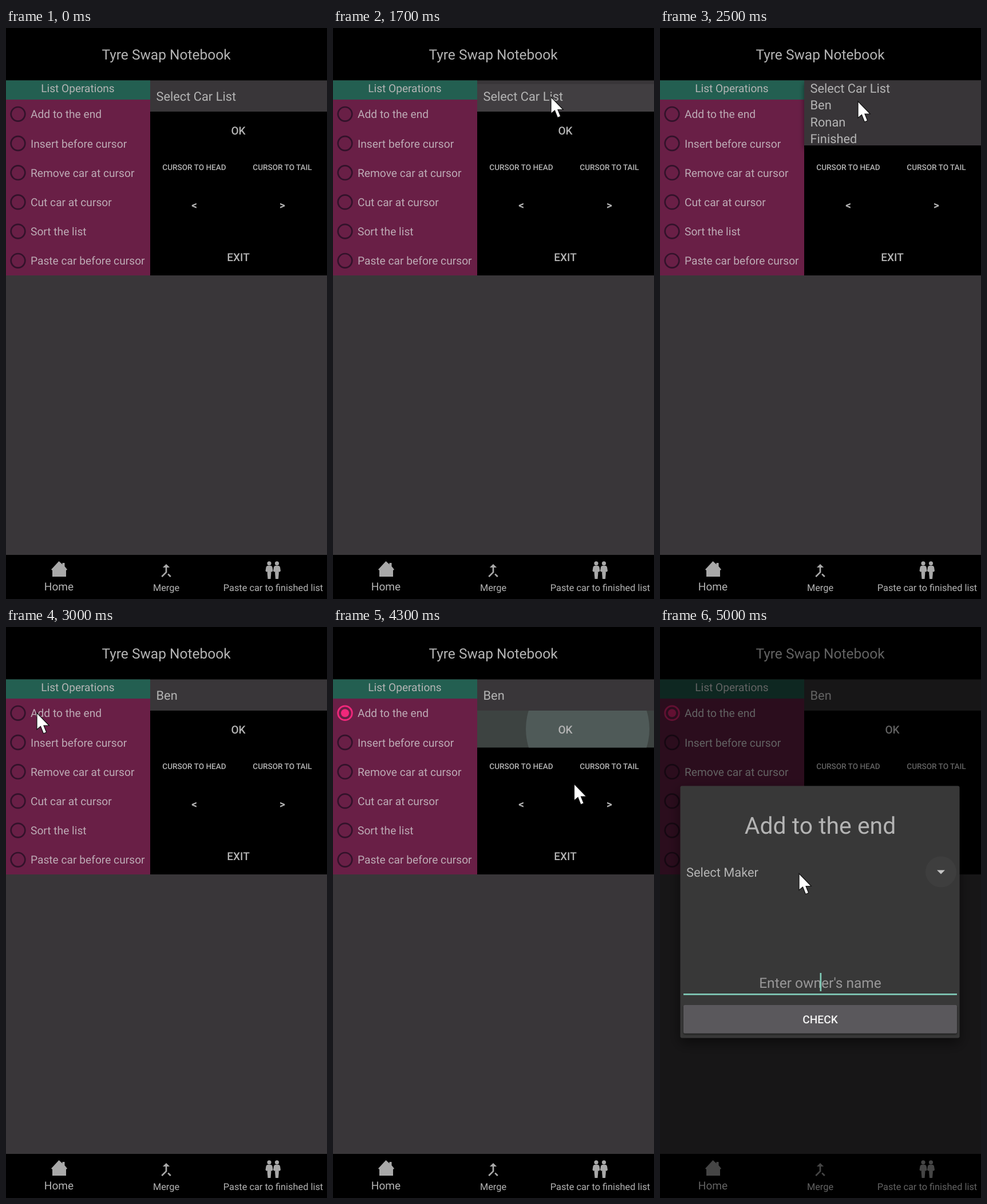
Write an HTML page that moves like this. It is 561 px wide and 997 px high and loops after 5100 ms.

```html
<!DOCTYPE html>
<html lang="en">
<head>
<meta charset="utf-8">
<title>Car list</title>
<style>
  html, body { margin: 0; height: 100%; overflow: hidden; background: #000; }
  svg { display: block; width: 561px; height: 997px; font-family: Roboto, "Liberation Sans", sans-serif; text-rendering: geometricPrecision; }
  text { fill: #b4b4b4; }
  .mid { text-anchor: middle; }
  .btn { text-anchor: middle; font-weight: 500; font-size: 19.1px; }
  .small { font-size: 13.6px; }
  .arrow { font-weight: 700; }
  .item { font-size: 21.8px; }
  .radio { font-size: 19.2px; fill: #bdabb5; }
  .icon { fill: #a9a9a9; }
  .behind text { fill: #f0f0f0; }
</style>
</head>
<body>
<svg viewBox="0 0 561 997">
  <defs>
    <clipPath id="okClip"><rect x="252" y="146" width="309" height="64.500"/></clipPath>
    <filter id="shadow" x="-20%" y="-20%" width="140%" height="140%">
      <feDropShadow dx="0" dy="9" stdDeviation="11" flood-opacity=".5"/>
    </filter>
    <filter id="menuShadow" x="-10%" y="-20%" width="120%" height="150%">
      <feDropShadow dx="0" dy="5" stdDeviation="5" flood-opacity=".5"/>
    </filter>
    <filter id="low" x="-5%" y="-20%" width="110%" height="150%">
      <feDropShadow dx="0" dy="2" stdDeviation="1.5" flood-opacity=".5"/>
    </filter>
    <path id="man" d="M-3 -8H3Q5 -8 5.500 -5.500L6.500 1L4.500 3L3.300 2V6L2.500 15H-2.500L-3.300 6V2L-4.500 3L-6.500 1L-5.500 -5.500Q-5 -8 -3 -8zM-3.600-12.200a3.600 3.600 0 1 0 7.200 0a3.600 3.600 0 1 0-7.200 0z"/>
  </defs>

  <g id="page">
    <rect width="561" height="997"/>
    <rect y="91.500" width="561" height="828.500" fill="#393639"/>
    <rect y="91.500" width="252" height="33.500" fill="#235f51"/>
    <rect y="125" width="252" height="307" fill="#691f46"/>
    <rect x="252" y="146" width="309" height="286"/>
    <text class="mid" x="280" y="55" font-size="24.500">Tyre Swap Notebook</text>
    <text class="mid" x="125.500" y="112" font-size="19.100">List Operations</text>
    <g id="radios"></g>
    <circle id="halo" cx="21" cy="150.300" r="21" fill="#f0287b" opacity=".17"/>
    <g id="picked" fill="none" stroke="#f0287b" stroke-width="3">
      <circle cx="21" cy="150.300" r="12.300"/>
      <circle id="dot" cx="21" cy="150.300" fill="#f0287b" stroke="none"/>
    </g>

    <rect id="fieldGlow" x="252" y="98" width="309" height="48" fill="#fff" opacity=".04"/>
    <text id="chosen" class="item" x="262.500" y="127"></text>
    <g id="okRipple" clip-path="url(#okClip)">
      <rect id="okBase" x="252" y="146" width="309" height="65" fill="#3d4341"/>
      <circle id="okCircle" cx="445" cy="178" fill="#4f5a58"/>
    </g>
    <text class="btn" x="406" y="185.500">OK</text>
    <text class="btn small" x="329" y="248">CURSOR TO HEAD</text>
    <text class="btn small" x="483" y="248">CURSOR TO TAIL</text>
    <text class="btn arrow" x="329" y="315.500">&lt;</text>
    <text class="btn arrow" x="483" y="315.500">&gt;</text>
    <text class="btn" x="406" y="407">EXIT</text>

    <g id="menu">
      <rect x="252" y="91.500" width="309" height="113.500" fill="#393639" filter="url(#menuShadow)"/>
    </g>

    <g class="icon">
      <path d="M92.500 931l6 5.500V934h4v6l4.500 5.500-2 1.500V958H81V947l-2-1.500z"/>
      <path transform="translate(263.700 931.200) scale(1.360)" d="M17 20.410L18.410 19 15 15.590 13.590 17zM7.500 8H11v5.590L5.590 19 7 20.410l6-6V8h3.500L12 3.500z"/>
      <use href="#man" x="460" y="947"/>
      <use href="#man" x="473.500" y="947"/>
    </g>
    <text class="mid" x="92.500" y="982" font-size="19.100">Home</text>
    <text class="mid" x="280" y="982.500" font-size="16.350">Merge</text>
    <text class="mid" x="467" y="982.500" font-size="16.350">Paste car to finished list</text>
  </g>

  <g id="dialog">
    <rect id="dim" width="561" height="997"/>
    <rect x="35.500" y="277.500" width="488" height="440" rx="3" fill="#393739" filter="url(#shadow)"/>
    <text class="mid" x="280" y="361" font-size="40.900">Add to the end</text>
    <text class="item" x="46" y="435.500">Select Maker</text>
    <circle id="arrowGlow" cx="491" cy="427.500" r="27" fill="#fff" opacity=".03"/>
    <path d="M484 424.500h14l-7 7z" fill="#c4c4c4"/>
    <text class="mid" x="280" y="630" font-size="24.500" style="fill:#989798">Enter owner's name</text>
    <rect x="41" y="640" width="478" height="2.700" fill="#80cbb8"/>
    <rect id="caret" x="279.500" y="604" width="2.700" height="32" fill="#80cbb8"/>
    <rect x="41" y="660" width="478" height="49.500" rx="2.500" fill="#5a585b" filter="url(#low)"/>
    <text class="btn" x="280" y="692" style="fill:#f4f4f4">CHECK</text>
  </g>

  <path id="cursor" d="M0 0V29L6.500 23.500L11.500 36L16.700 33.700L12 22H21.300z" fill="#fff" stroke="#111" stroke-width="1.200"/>
</svg>
<script>
const $ = id => document.getElementById(id);
const LOOP = 5100, STEP = 100;

$('radios').innerHTML = ['Add to the end', 'Insert before cursor', 'Remove car at cursor',
  'Cut car at cursor', 'Sort the list', 'Paste car before cursor'].map((label, i) => {
    const y = 150.3 + i * 51.2;
    return `<circle cx="21" cy="${y}" r="12.300" fill="none" stroke="#32122a" stroke-width="2.700"/>
      <text class="radio" x="43" y="${y + 7}">${label}</text>`;
  }).join('');

$('menu').innerHTML += ['Select Car List', 'Ben', 'Ronan', 'Finished'].map((label, i) =>
  `<text class="item" x="262.500" y="${112.5 + i * 29.6}">${label}</text>`).join('');

// Pointer path: time, x, y
const path = [
  [100, 434, 933], [500, 40, 165], [1000, 40, 165], [1500, 370, 150], [1700, 381, 120.5],
  [2000, 372, 124], [2200, 352, 126], [2300, 346, 128], [2500, 346, 128], [2700, 330, 138],
  [3000, 54, 150], [3400, 24, 158], [3600, 484, 201], [3800, 470, 190], [4000, 445, 178],
  [4100, 445, 180], [4200, 436, 228], [4300, 421.5, 274], [4400, 421.5, 274], [4800, 255, 420],
  [5000, 243, 430.5]
];

function pointerAt(t) {
  const i = path.findIndex(p => p[0] >= t);
  if (i < 1) return path[i < 0 ? path.length - 1 : 0].slice(1);
  const a = path[i - 1], b = path[i], k = (t - a[0]) / (b[0] - a[0]);
  return [a[1] + (b[1] - a[1]) * k, a[2] + (b[2] - a[2]) * k];
}

const show = (id, on) => { $(id).style.display = on ? '' : 'none'; };
const within = (t, from, to) => t >= from && t < to;

function draw(t) {
  show('cursor', t >= 100);
  $('cursor').setAttribute('transform', `translate(${pointerAt(t)})`);

  show('fieldGlow', within(t, 1700, 1900));
  show('menu', within(t, 1900, 2700));
  show('chosen', !within(t, 1900, 2700));
  $('chosen').textContent = t < 2700 ? 'Select Car List' : 'Ben';

  show('picked', t >= 3500);
  show('halo', within(t, 3500, 3900));
  $('dot').setAttribute('r', within(t, 3600, 3700) ? 13 : 7);

  show('okRipple', within(t, 4200, 4400));
  $('okBase').setAttribute('opacity', t < 4300 ? 0.5 : 1);
  $('okCircle').setAttribute('r', t < 4300 ? 55 : 108);

  show('dialog', t >= 4400);
  $('page').classList.toggle('behind', t >= 4400);
  $('dim').setAttribute('opacity', t < 4500 ? 0.45 : 0.59);
  show('caret', !within(t, 4600, 4900));
  show('arrowGlow', t >= 5000);
}

const start = performance.now();
function tick() {
  const t = (performance.now() - start) % LOOP;
  draw(Math.floor(t / STEP) * STEP);
  requestAnimationFrame(tick);
}
tick();
</script>
</body>
</html>
```
